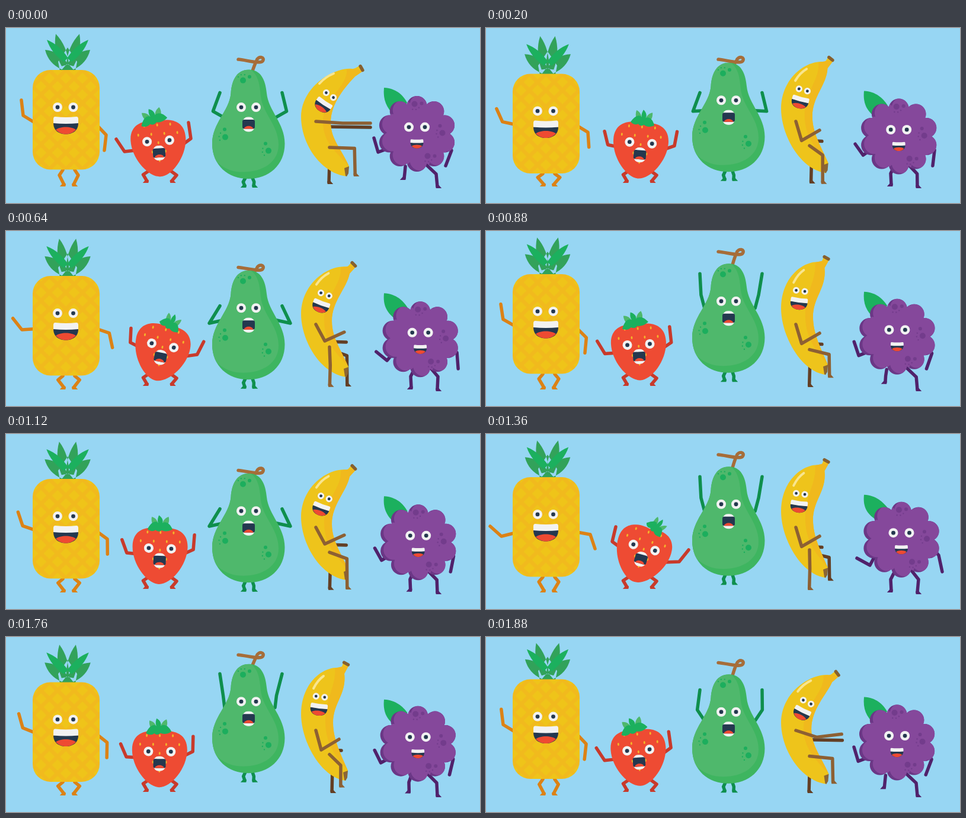
Write an HTML page that moves like this. It is 800 px wide and 296 px high and loops after 1.92 s.

```html
<!DOCTYPE html>
<html lang="en">
<head>
<meta charset="utf-8">
<title>Dancing fruit</title>
<style>
  html, body { margin: 0; width: 100%; height: 100%; overflow: hidden; background: #97d6f3; }
  svg { display: block; width: 100vw; height: 100vh; }
  .limb { fill: none; stroke: currentColor; stroke-width: 5.5; stroke-linecap: round; stroke-linejoin: round; }
  .foot { fill: currentColor; stroke: none; }
</style>
</head>
<body>
<svg viewBox="0 0 800 296">
  <defs>
    <g id="eye"><circle r="8" fill="#f2f2f2"/><circle r="3.4" fill="#24384f"/></g>
    <g id="grin">
      <path fill="#24384f" d="M-21-1H21C21 12 11 17.5 0 17.5S-21 12-21-1z"/>
      <path fill="#ee4a32" d="M-17 10C-9 4 9 4 17 10C12 15.500 6 17.500 0 17.500S-12 15.500-17 10z"/>
      <path fill="#f2f2f2" d="M-18-12Q0-10 18-12Q21-12 21-8V-1Q0 1-21-1V-8Q-21-12-18-12z"/>
    </g>
    <g id="shout">
      <rect x="-10" y="-12.500" width="20" height="25" rx="8.500" fill="#f2f2f2"/>
      <rect x="-10.500" y="-8" width="21" height="15.500" rx="3" fill="#24384f"/>
      <path fill="#ee4a32" d="M-8 7.500C-6 1 6 1 8 7.500z"/>
    </g>
    <pattern id="lattice" x="45" y="71" width="28" height="28" patternUnits="userSpaceOnUse">
      <rect width="28" height="28" fill="#efc419"/>
      <path d="M-4-4 32 32M-4 32 32-4M24-4 32 4M-4 24 4 32" stroke="#f1ba1d" stroke-width="6.500"/>
    </pattern>
    <path id="pearShape" d="M410 70C430 70 438 87 440 110C443 140 470.500 160 470.500 195C470.500 232 443 254.500 409 254.500S348 232 348 195C348 160 377 140 379.500 110C381 87 390 70 410 70z"/>
    <clipPath id="pearClip"><use href="#pearShape"/></clipPath>
    <path id="bumps"/>
    <clipPath id="bumpClip"><use href="#bumps"/></clipPath>
  </defs>

  <!-- pineapple -->
  <g class="limb" color="#dc8215">
    <path id="pineArmL"/><path id="pineArmR"/>
    <path id="pineLegL"/><path class="foot"/>
    <path id="pineLegR"/><path class="foot"/>
  </g>
  <path id="crownDark" fill="#32a25a"/>
  <path id="crownLight" fill="#1cb05e"/>
  <g id="pine">
    <rect x="45" y="71" width="113" height="168.500" rx="30" fill="url(#lattice)"/>
    <use href="#eye" x="87" y="134"/><use href="#eye" x="113.500" y="134"/>
    <use href="#grin" x="101" y="162"/>
  </g>

  <!-- strawberry -->
  <g class="limb" color="#c83a2b">
    <path id="strawArmL"/><path id="strawArmR"/>
    <path id="strawLegL"/><path class="foot"/>
    <path id="strawLegR"/><path class="foot"/>
  </g>
  <g id="straw">
    <path fill="#ee4b33" d="M0-33C15-37 46.500-36 46.500-3C46.500 28 20 60.500 0 60.500S-46.500 28-46.500-3C-46.500-36-15-37 0-33z"/>
    <g id="seeds" fill="#f4b52a"></g>
    <use href="#eye" x="-19"/><use href="#eye" x="19"/>
    <use href="#shout" y="20.500"/>
    <g id="sepal">
      <path fill="#4eb86c" d="M-16-18C-6-16-4-8-2-2H-12C-16-8-17-13-16-18zM15-19C6-16 4-8 2-2H12C16-8 17-13 15-19z"/>
      <path fill="#1cb05e" d="M-23 3C-16-10-8-12-4-8C-6-14-4-18-3-21C3-18 6-12 4-8C10-12 18-8 23 2C14 7 8 6 3 4C0 7-5 7-8 4C-12 7-18 7-23 3z"/>
    </g>
  </g>

  <!-- pear -->
  <g class="limb" color="#0f8f4d">
    <path id="pearArmL"/><path id="pearArmR"/>
    <path id="pearLegL"/><path class="foot"/>
    <path id="pearLegR"/><path class="foot"/>
  </g>
  <path id="pearStem" class="limb" color="#a66d39"/>
  <g id="pear">
    <use href="#pearShape" fill="#3eb560"/>
    <path clip-path="url(#pearClip)" fill="#4fb86c" d="M404 66C425 72 428 92 430 115C433 144 460 164 460 197C460 226 434 243 400 243C375 243 358 232 345 212V60z"/>
    <g id="pearSpots" fill="#1cae5d"></g>
    <use href="#eye" x="397" y="133.500"/><use href="#eye" x="422" y="133.500"/>
    <use href="#shout" x="409.500" y="162.500"/>
  </g>

  <!-- banana -->
  <g class="limb" color="#633f25">
    <path id="banArmB"/>
    <path id="banLegB"/><path class="foot"/>
  </g>
  <path id="banBody" fill="#eec41b"/>
  <path id="banShade" fill="#f0b91d"/>
  <path id="banEnd" fill="#8b6634"/>
  <path id="banCap" class="limb" color="#86602f"/>
  <path id="banShine" class="limb" color="#f8e58f" style="stroke-width:4"/>
  <g id="banFace">
    <use href="#eye" transform="translate(-7.300 0)scale(.7)"/>
    <use href="#eye" transform="translate(7.300 0)scale(.7)"/>
    <use href="#grin" transform="translate(0 20)scale(.69)"/>
  </g>
  <g class="limb" color="#8d6033">
    <path id="banArmF"/>
    <path id="banLegF"/><path class="foot"/>
  </g>

  <!-- blackberry -->
  <g class="limb" color="#50226b">
    <path id="berryArmL"/><path id="berryArmR"/>
    <path id="berryLegL"/><path class="foot"/>
    <path id="berryLegR"/><path class="foot"/>
  </g>
  <path id="berryLeaf" fill="#1cb05e"/>
  <g id="berry">
    <use href="#bumps" fill="#6b3786"/>
    <g clip-path="url(#bumpClip)"><use href="#bumps" x="5" y="-2" fill="#85489b"/></g>
    <g id="berrySpots" fill="#733c8c"></g>
    <use href="#eye" x="-13.500"/><use href="#eye" x="13.500"/>
    <use href="#grin" transform="translate(0 27)scale(.52)"/>
  </g>
</svg>
<script>
const BEAT = 480;
const $ = id => document.getElementById(id);
const put = (id, d) => $(id).setAttribute('d', d);
const move = (id, v) => $(id).setAttribute('transform', v);
const line = pts => 'M' + pts.map(v => v.toFixed(2)).join(' ');
const mix = (a, b, u) => a.map((v, i) => v + (b[i] - v) * u);

// 1 at the peak, 0 half a period away
const wave = (t, period, peak) => .5 + .5 * Math.cos(2 * Math.PI * (t - peak) / period);
const sway = t => wave(t, 2 * BEAT, 470) / .95;
const squat = t => wave(t, BEAT, 245);

// Snaps to 1 during the last 80 ms of a beat, then eases back to 0.
function snap(t, fall) {
  const x = t % BEAT, rise = 80;
  if (x > BEAT - rise) return Math.sin(Math.PI / 2 * (x - BEAT + rise) / rise);
  return .5 + .5 * Math.cos(Math.PI * Math.min(1, x / fall));
}

function leg(id, pts, dir) {
  const [x, y] = pts.slice(-2);
  put(id, line(pts));
  $(id).nextElementSibling.setAttribute('d',
    `M${x - 2.7 * dir} ${y - 2}h${5.4 * dir}l${4.5 * dir} 5h${-9.5 * dir}z`);
}

// Blunt at the base, pointed at the tip
function leaf(bx, by, tx, ty, w) {
  const dx = tx - bx, dy = ty - by, k = w / Math.hypot(dx, dy);
  const nx = -dy * k, ny = dx * k, mx = bx + dx * .55, my = by + dy * .55;
  return `M${bx + nx * .7} ${by + ny * .7}Q${mx + nx * 1.4} ${my + ny * 1.4} ${tx} ${ty}`
    + `Q${mx - nx * 1.4} ${my - ny * 1.4} ${bx - nx * .7} ${by - ny * .7}z`;
}

// Fixed details
const disc = (x, y, r) => `M${x - r} ${y}a${r} ${r} 0 1 1 ${2 * r} 0a${r} ${r} 0 1 1 ${-2 * r} 0z`;
put('bumps', disc(0, 11.5, 47) + Array.from({ length: 10 }, (_, i) => {
  const a = i * Math.PI / 5 - Math.PI / 2;
  return disc(49 * Math.cos(a), 11.5 + 47 * Math.sin(a), 17);
}).join(''));

// One large spot, a smaller one beside it and specks turning away from that
function spots(x, y, dx, dy, spin) {
  const specks = [45, 80, 115].map(deg => {
    const a = spin * deg * Math.PI / 180, c = .8 * Math.cos(a), s = .8 * Math.sin(a);
    return disc(x + dx * c - dy * s, y + dx * s + dy * c, 1.2);
  });
  return `<path d="${disc(x, y, 5)}${disc(x + dx, y + dy, 3)}${specks.join('')}"/>`;
}
$('pearSpots').innerHTML = spots(400, 88, 11, -6, -1) + spots(370, 184, -1, -13, -1) + spots(443, 207, -5, -12, -1);
$('berrySpots').innerHTML = spots(-4, -39, 12, -1, 1) + spots(43, 10, -4, -12, -1) + spots(18, 49, 12, 0, 1);

let seeds = '';
for (let row = 0; row < 6; row++) {
  const y = -27 + 15 * row, half = 42 - Math.abs(y + 4) * .6;
  for (let x = row % 2 ? -33 : -44; x <= 44; x += 22)
    if (Math.abs(x) < half) seeds += `<ellipse cx="${x}" cy="${y}" rx="1.5" ry="2.5"/>`;
}
$('seeds').innerHTML = seeds;

function drawPineapple(t) {
  const u = sway(t), q = squat(t), dy = 7 * q, base = 73 + dy;
  move('pine', `translate(0 ${dy})`);
  put('pineArmL', line(mix([26, 122, 29, 148, 50, 161], [7, 156, 26, 173, 50, 167], u)));
  put('pineArmR', line(mix([154, 165, 169, 181, 166, 207], [154, 166, 176, 170, 184, 194], u)));
  for (const [side, s] of [['L', -1], ['R', 1]])
    leg('pineLeg' + side, [106 + 10 * s, 240 + dy, 106 + (16 + 3 * q) * s, 249 + 4 * q, 106 + 8 * s, 265], s);
  const pair = (spread, x, y, by, w) =>
    [-1, 1].map(s => leaf(104 + spread * s, by, 104 + x * s, y, w)).join('');
  put('crownDark', pair(4, 20 - 8 * q, 10 + 4 * q, base - 10, 9) + pair(5, 38 + q, 37 + 8 * q, base - 8, 10)
    + `M91 ${base}L88 ${base - 16}L104 ${base - 40}L120 ${base - 16}L117 ${base}z`);
  put('crownLight', pair(3, 35 + q, 20 + 8 * q, base - 19, 7));
}

function drawStrawberry(t) {
  const u = sway(t);
  const [x, tilt, sx, turn, wide] = mix([257, -4, -5, -13, 1], [267, 16, 8, 32, .72], u);
  move('straw', `translate(${x} ${191 + 3.5 * squat(t)})rotate(${tilt})`);
  move('sepal', `translate(${sx} -35)rotate(${turn})scale(${wide} 1)`);
  put('strawArmL', line(mix([186, 188, 200, 209, 218, 207], [219, 157, 213, 182, 228, 193], u)));
  put('strawArmR', line(mix([308, 160, 312, 187, 297, 198], [342, 196, 326, 216, 300, 217], u)));
  leg('strawLegL', [242, 241, 231.5, 248, 238, 259], -1);
  leg('strawLegR', [277, 241, 288, 249, 279.5, 259], 1);
}

function drawPear(t) {
  const y = 140 - 31 * wave(t, BEAT, 310), dy = y - 133.5;
  const follow = wave(t, BEAT, 341), s = 67 - 37.5 * follow;
  move('pear', `translate(0 ${dy})`);
  put('pearStem', `M392 ${s}C405 ${s + 1} 428 ${s + 8} 433 ${s + 3}C438 ${s - 4} 426 ${s - 7} 423 ${s + 2}Q420 ${s + 8} 416 ${Math.max(72 + dy, s + 9)}`);
  const arm = mix([361, 138, 339, 166, 368, y + 22], [361, 61, 367, 98, 369, y + 10], follow);
  put('pearArmL', line(arm));
  put('pearArmR', line(arm.map((v, i) => i % 2 ? v : (i ? 823 : 827) - v)));
  const ground = Math.min(267, y + 133.5), hip = 253 + dy;
  const bend = Math.max(0, 14.5 - ground + hip) * .7 + 2;
  leg('pearLegL', [404, hip, 403 - bend, (hip + ground) / 2, 403, ground], -1);
  leg('pearLegR', [416, hip, 416 + bend, (hip + ground) / 2, 418, ground], 1);
}

function bananaLeg(id, t) {
  const step = wave(t, 2 * BEAT, 30) ** 2, lift = wave(t, 2 * BEAT, -60) ** 5;
  leg(id, [546, 196 + 6 * step, 546 + 43 * step, 228 - 25 * step, 545 + 45 * step, 261 - 16 * lift], 1);
}

function drawBanana(t) {
  const bend = snap(t, 320), reach = snap(t, 220);
  // stem end, neck outside, neck inside, belly height, lower end, waist
  const [tx, ty, ax, ay, bx, by, belly, px, py, wx, wy] = mix(
    [574, 45, 564, 52, 571, 62, 130, 573, 243, 552, 145],
    [600, 68, 584, 69, 589, 82, 150, 575, 251, 548, 160], bend);
  const dx = tx - (ax + bx) / 2, dy = ty - (ay + by) / 2, k = 5.5 / Math.hypot(dx, dy);
  const nx = -dy * k, ny = dx * k, rx = px + 4, ry = py - 17;
  const inner = `M${rx} ${ry}C${rx - 12} ${ry - 28} ${wx} ${wy + 28} ${wx} ${wy}`
    + `C${wx} ${wy - 34} 575 97 ${bx} ${by}L${tx + nx} ${ty + ny}`;
  put('banBody', inner + `L${tx - nx} ${ty - ny}Q${ax + 3} ${ay + 1} ${ax} ${ay}`
    + `C${ax - 31} ${ay - 3} 498 ${belly - 50} 498 ${belly}C498 ${belly + 45} 530 ${py - 6} ${px} ${py}z`);
  put('banShade', inner + `L${(tx + ax) / 2} ${(ty + ay) / 2 + 1}L${ax - 9} ${ay + 1}`
    + `C${ax - 6} ${ay + 30} ${wx - 14} ${wy - 40} ${wx - 13} ${wy}C${wx - 12} ${wy + 35} ${rx - 22} ${ry - 25} ${rx} ${ry}z`);
  put('banEnd', `M${rx} ${ry}L${px - 4} ${py - 14}L${px - 2} ${py - 1}L${px} ${py}L${px + 3} ${py - 5}z`);
  put('banCap', line([tx - nx * .7, ty - ny * .7, tx + nx * .7, ty + ny * .7]));
  const [sx, sy, ex, ey] = mix([519, 87, 536, 66], [529, 94, 553, 77], bend);
  put('banShine', `M${sx} ${sy}Q${sx + (ex - sx) * .42} ${sy + (ey - sy) * .68} ${ex} ${ey}`);
  const [fx, fy, tilt] = mix([530.5, 101, 7], [546.5, 113.5, 34], bend);
  move('banFace', `translate(${fx} ${fy})rotate(${tilt})`);
  put('banArmF', line(mix([523, 158, 532, 191, 562, 173], [523, 158, 568, 161, 615, 161], reach)));
  put('banArmB', line(mix([540, 191, 566, 192], [545, 167, 615, 168], reach)));
  bananaLeg('banLegF', t);
  bananaLeg('banLegB', t + BEAT);
}

function drawBlackberry(t) {
  const u = sway(t), x = 693.5 + 7.5 * u, y = 167 + 5 * squat(t + 55), tip = 101 + 6 * squat(t);
  move('berry', `translate(${x} ${y})`);
  put('berryLeaf', `M638 ${tip}C658 ${tip + 1} 670 ${tip + 12} ${677 + 2 * u} ${y - 41}L${x - 30} ${y - 20}`
    + `L${x - 38} ${y - 20}C642 ${tip + 34} 636 ${tip + 20} 638 ${tip}z`);
  put('berryArmL', line(mix([621, 186, 628, 210, 650, 202], [626, 210, 648, 222, 657, 205], u)));
  put('berryArmR', line(mix([744, 196, 752, 207, 742, 233], [754, 194, 764, 205, 770, 233], u)));
  const plant = Math.min(1, 3 * u);
  leg('berryLegL', mix([674, 234, 673, 245, 672, 254], [688, 236, 683, 246, 684, 265], plant), -1);
  leg('berryLegR', mix([710, 232, 726, 247, 728, 268], [719, 232, 730, 246, 728, 268], u), 1);
}

const cast = [drawPineapple, drawStrawberry, drawPear, drawBanana, drawBlackberry];
function frame() {
  const t = performance.now() % (4 * BEAT);
  cast.forEach(draw => draw(t));
  requestAnimationFrame(frame);
}
frame();
</script>
</body>
</html>
```
